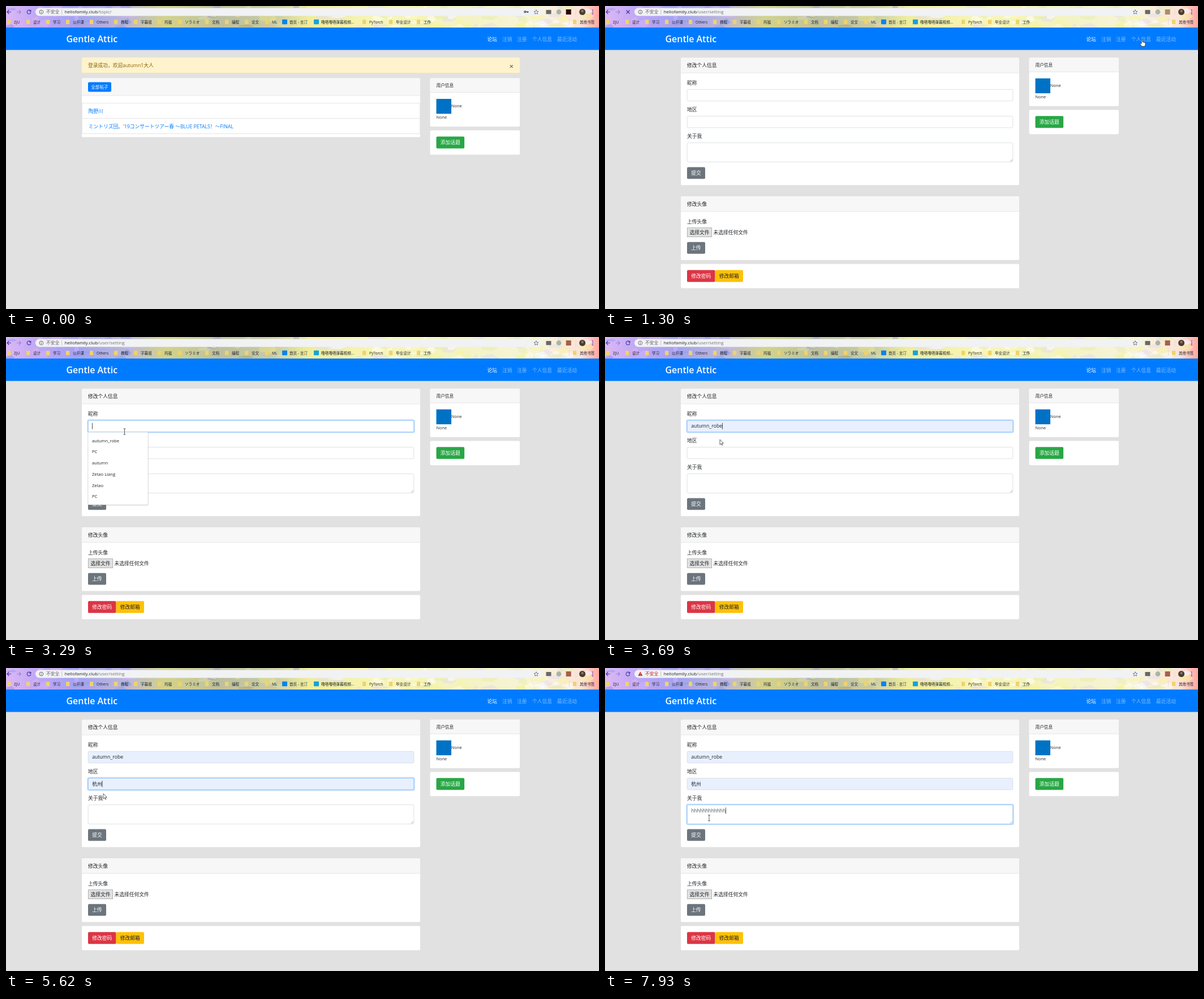
An HTML page for the animation above (8 s loop, 1048 px wide and 535 px high).

```html
<!DOCTYPE html>
<html lang="zh-CN">
<head>
<meta charset="utf-8">
<title>Gentle Attic</title>
<style>
html, body { margin: 0; width: 100%; height: 100%; overflow: hidden; background: #e1e1e1; }
svg { display: block; width: 100%; height: 100%; }
text { font-family: "Open Sans", "Noto Sans CJK SC", "Noto Sans CJK", sans-serif; white-space: pre; }
</style>
</head>
<body>
<svg id="stage" viewBox="0 0 1048 535" preserveAspectRatio="none"></svg>
<script>
const LOOP = 8000, INK = '#212529', BLUE = '#007bff', BASE = 8.74, SMALL = 7.64;
const stage = document.getElementById('stage');
const $ = id => document.getElementById(id);

// markup helpers
const rect = (x, y, w, h, fill, r = 0, more = '') =>
  `<rect x="${x}" y="${y}" width="${w}" height="${h}" rx="${r}" fill="${fill}" ${more}/>`;
const text = (x, y, s, size = BASE, fill = INK, more = '') =>
  `<text x="${x}" y="${y}" font-size="${size}" fill="${fill}" ${more}>${s}</text>`;
const line = (d, color, w = 1, more = '') =>
  `<path d="${d}" fill="none" stroke="${color}" stroke-width="${w}" ${more}/>`;
const circle = (x, y, r, fill, more = '') => `<circle cx="${x}" cy="${y}" r="${r}" fill="${fill}" ${more}/>`;
const group = (id, s, more = '') => `<g id="${id}" ${more}>${s}</g>`;
const button = (x, y, w, h, fill, s, color = '#fff', size = BASE) =>
  rect(x, y, w, h, fill, 2) + text(x + w / 2, y + h / 2 + size * .37, s, size, color, 'text-anchor="middle"');
const card = (x, y, w, h, head = 0) => rect(x, y, w, h, '#fff', 2) +
  (head ? rect(x, y, w, head, '#f7f7f7', 2) + line(`M${x} ${y + head}h${w}`, '#dfdfdf', .7) : '');

// browser theme: gradient with seeded blotches
function theme() {
  const stops = [[0, '#dcb8f4'], [6, '#bba6f6'], [12, '#a3a2f0'], [20, '#bab6d8'], [27, '#d2d38c'], [36, '#bcc0a0'],
    [45, '#c8cba4'], [51, '#efed9c'], [62, '#f7f5b6'], [78, '#f4f3c4'], [90, '#f7f4dc'], [97, '#fbe3d8'], [100, '#ffa6a0']];
  const tones = [['#908ef0', '#cdb6ff', '#e2b8ee', '#86a2f0'], ['#a3a37a', '#e8e48a', '#989dca', '#d9dbb6'],
    ['#f9f3a0', '#ffffff', '#e3dcf0', '#e6eeb0']];
  let seed = 7;
  const rnd = () => (seed = seed * 16807 % 2147483647) / 2147483647;
  let s = '<linearGradient id="sky">' + stops.map(([o, c]) => `<stop offset="${o}%" stop-color="${c}"/>`).join('') +
    '</linearGradient>' + rect(0, 0, 1048, 38, 'url(#sky)');
  for (let i = 0; i < 110; i++) {
    const x = rnd() * 1020, y = rnd() * 38, w = 5 + rnd() * 16, h = 2 + rnd() * 5;
    const zone = tones[x < 210 ? 0 : x < 540 ? 1 : 2];
    s += `<path d="M${x} ${y}l${w} ${-h}l${w * .6} ${h * 1.4}l${-w * .5} ${h}l${-w} ${-h * .3}z" fill="${zone[i % 4]}" opacity=".5"/>`;
  }
  return `<g clip-path="inset(0)"><svg width="1048" height="38">${s}</svg></g>`;
}

function toolbar() {
  const marks = [[14, 'ZJU'], [48, '设计'], [83, '学习'], [118, '公开课'], [160, 'Others'], [203, '教程'], [238, '字幕组'],
    [280, '托福'], [316, 'ソラミオ'], [364, '文档'], [399, '编程'], [434, '论文'], [470, 'ML'], [501, '首页 - 言汀', '#0a84e8'],
    [557, '噜嗒噜嗒弹幕视频...', '#16a3d8'], [642, 'PyTorch'], [689, '毕业设计'], [738, '工作'], [1014, '其他书签']];
  const url = path => text(103.7, 13.4, `hellofamily.club<tspan fill="#72767b">${path}</tspan>`, 8);
  return theme() + rect(52, 3.5, 896, 14, '#f1f2f4', 7) +
    line('M9 10.5H2.2M5.4 7L2 10.5L5.4 14', '#4030b0', 1.1) +
    line('M19 10.5H26M22.8 7L26.2 10.5L22.8 14', '#9a83dc', 1.1) +
    group('reload', line('M43.2 8.4A3.4 3.4 0 1 0 43.9 11.2', '#4030a0', 1.1) + '<path d="M44.4 6.6v3.4h-3.4z" fill="#4030a0"/>') +
    group('stop', line('M37.6 7.5l6 6m0-6l-6 6', '#4030a0', 1.1)) +
    group('info', circle(62.4, 10.5, 3.4, 'none', 'stroke="#5f6368" stroke-width=".9"') + line('M62.4 10v2.4M62.4 8.3v1', '#5f6368', .9)) +
    group('warn', '<path d="M62.4 6.6L66.4 13.8H58.4Z" fill="#c5221f"/>' + line('M62.4 9v2.2M62.4 12v.9', '#fff', .8)) +
    text(71, 13.4, '不安全', 7.8, '#5f6368', 'id="unsafe"') + line('M98.7 6v9', '#b5b8bc', .8) +
    group('urlA', url('/topic/') + circle(917.3, 10.3, 1.5, 'none', 'stroke="#444" stroke-width="1.3"') +
      line('M919 10.3h4.5M922 10.3v1.9', '#444', 1.4)) +
    group('urlB', url('/user/setting')) +
    line('M937 6.6l1.1 2.7 2.9.2-2.2 1.9.7 2.8-2.5-1.5-2.5 1.5.7-2.8-2.2-1.9 2.9-.2z', '#5f6368', .8) +
    rect(954.5, 7, 9, 7.2, '#686868', .6) + circle(977, 10.5, 4.4, '#a9b5a4') +
    rect(989.7, 6, 9, 9, '#2a0508', 0, 'id="addon"') + line('M1007 5v11', '#ddd6c4', .6) +
    circle(1018.6, 10.5, 5.5, '#4a3c30') + circle(1018.6, 9, 2.2, '#8b7660') +
    [7.2, 10.5, 13.8].map(y => circle(1036.8, y, 1, '#6a38a8')).join('') +
    line('M995.5 23v10', '#d8d2b8', .7) +
    marks.map(([x, s, c]) => (c ? rect(x - 13, 23.7, 9, 8.6, c, 1) : rect(x - 12, 24.2, 6.2, 7.8, '#f2d268', .8)) +
      text(x, 30.6, s, 6.6, '#202124')).join('');
}

const links = [[850.5, '论坛', 18], [877, '注销', 18], [903, '注册', 18], [930, '个人信息', 35], [974, '最近活动', 35]];
const navbar = () => rect(0, 38, 1048, 39.6, BLUE) + text(106.4, 64.2, 'Gentle Attic', 16, '#fff', 'font-weight="600"') +
  links.map(([x, s], i) => text(x, 61.8, s, BASE, '#fff', `id="link${i}"`)).join('');

const sidebar = dy => `<g transform="translate(0 ${dy})">` + card(749.6, 127.5, 158.4, 85.4, 25) +
  text(760.6, 143, '用户信息', SMALL) + rect(760.5, 164, 26.5, 26.3, '#0072c6') +
  text(787, 179.4, 'None', 7.3) + text(760.5, 199.2, 'None', 7.3) +
  card(749.6, 219.6, 158.4, 42.8) + button(760.5, 230.4, 49.6, 21, '#28a745', '添加话题') + '</g>';

const forum = () => rect(134, 91, 774, 27, '#fff3cd', 2, 'stroke="#ffeeba" stroke-width=".6"') +
  text(145, 108, '登录成功，欢迎autumn1大人', BASE, '#856404') +
  text(893.3, 111, '×', 13.1, '#7f7a67', 'font-weight="700" text-anchor="middle"') +
  card(134, 127.5, 598, 104, 30.6) + button(145, 134.4, 41, 17, BLUE, '全部帖子', '#fff', SMALL) +
  line('M134.4 171.5H731.6V225.5H134.4ZM134.4 198.5H731.6', '#dfdfdf', .8) +
  text(145.8, 188.5, '陶野川', BASE, BLUE) +
  text(145.8, 215.5, "ミントリズ団。'19コンサートツアー春 ～BLUE PETALS！～FINAL", BASE, BLUE) + sidebar(0);

const fields = [
  { y: 147.3, h: 20.4, base: 160.4, label: '昵称', from: 2280, to: 4840, open: 2370, hover: 3440, done: 3690,
    value: 'autumn_robe', items: ['autumn_robe', 'PC', 'autumn', 'Zetao Liang', 'Zetao', 'PC'] },
  { y: 194.5, h: 20.4, base: 207.8, label: '地区', from: 4840, to: 6390, open: 4990, hover: 5400, done: 5620,
    value: '杭州', items: ['杭州'] },
  { y: 241.6, h: 33.8, base: 255, label: '关于我', from: 6390, to: 1e6, items: [] }
];
const ROW = 19.7;
const control = (f, i) => text(145, f.y - 8.2, f.label) +
  rect(144.2, f.y - .9, 577.6, f.h + 1.8, 'none', 2.6, `id="ring${i}" stroke="#bfdeff" stroke-width="1.8"`) +
  rect(145.2, f.y, 575.6, f.h, '#fff', 2, `id="box${i}" stroke="#ced4da" stroke-width=".7"`) +
  rect(145.2, f.y, 575.6, f.h, 'none', 2, `id="edge${i}" stroke="#80bdff" stroke-width=".7"`) +
  text(152.2, f.base, '', i == 2 ? 8.25 : BASE, i == 2 ? '#495057' : INK, `id="value${i}"`);
const menu = (f, i) => {
  const top = f.y + f.h + .4, h = 10 + ROW * f.items.length;
  return group('menu' + i, rect(144.6, top + .6, 107, h + .6, '#000', 1.5, 'opacity=".14"') +
    rect(145, top, 106, h, '#fff', 1, 'stroke="#cfcfcf" stroke-width=".5"') +
    rect(145, top + 5, 106, ROW, '#ececec', 0, `id="row${i}"`) +
    f.items.map((s, k) => text(152, top + 17.6 + k * ROW, s, SMALL)).join(''));
};
const settings = () => card(134, 91.5, 598, 224.8, 26.6) + text(145, 108, '修改个人信息') +
  fields.map(control).join('') + line('M716 274.4l3.8-3.8M718 274.4l1.8-1.8', '#888', .6) +
  button(145, 284.4, 32, 20.8, '#6c757d', '提交') +
  card(134, 336, 598, 112.6, 26.6) + text(145, 352.6, '修改头像') + text(145, 384, '上传头像') +
  rect(145.3, 391.7, 43.4, 16, '#e1e1e1', 0, 'stroke="#999" stroke-width=".7"') +
  text(149.5, 403, '选择文件') + text(191.5, 403, '未选择任何文件') +
  button(145, 416.8, 32, 20.8, '#6c757d', '上传') +
  card(134, 455.5, 598, 42.8) + button(145, 466.3, 49.6, 21, '#dc3545', '修改密码') +
  button(194.6, 466.3, 49.4, 21, '#ffc107', '修改邮箱', INK) + sidebar(-36.2) +
  rect(0, 0, .7, 11, '#000', 0, 'id="caret"') + menu(fields[0], 0) + menu(fields[1], 1);

const skin = 'fill="#fff" stroke="#222" stroke-width=".7" stroke-linejoin="round"';
const pointer = () => group('pointer',
  `<path id="arrow" d="M0 0V9.2L2.1 7.2L3.5 10.3L4.9 9.7L3.5 6.7H6.4Z" ${skin}/>` +
  `<path id="hand" d="M-.9 .9C-.9-.3 .9-.3 .9 .9V4.2C1.5 3.7 2.6 3.9 2.7 4.8C3.4 4.3 4.3 4.6 4.4 5.4C5.2 5 6 5.4 6 6.2V8.5C6 10 5 10.5 5 11.8H-.8C-1 10-3.2 8.3-3.3 6.8C-3.2 5.9-1.9 6-.9 7.3Z" ${skin}/>` +
  line('M-2-5H2M0-5V5M-2 5H2', '#333', .8, 'id="beam"'));

stage.innerHTML = rect(0, 0, 1048, 535, '#e1e1e1') + group('forum', forum()) + group('settings', settings()) +
  navbar() + toolbar() + pointer();

// pointer stops: time, x, y
const path = [[120, 912, 504], [740, 985, 62], [890, 949, 59.5], [1510, 949, 59.5], [2130, 214, 157], [2830, 214, 157],
  [2990, 212, 158], [3140, 212, 158], [3290, 209.5, 167], [3520, 203, 181], [3920, 203, 181], [4460, 190.5, 188],
  [4690, 183, 202], [5240, 183, 202], [5620, 172, 221.8], [5770, 172, 221.8], [6160, 172, 254.5], [7780, 172, 254.5],
  [7930, 184, 264.8], [LOOP, 184, 264.8]];
const blinks = [2280, 3690, 4840, 5620, 6390, 6940, 7470];
const clamp = v => Math.max(0, Math.min(1, v));
const show = (id, on) => $(id).style.display = on ? '' : 'none';

function pointerAt(t) {
  const i = Math.max(1, path.findIndex(p => p[0] > t)), [a, x, y] = path[i - 1], [b, u, v] = path[i];
  const k = clamp((t - a) / (b - a)), e = k * k * (3 - 2 * k);
  return [x + (u - x) * e, y + (v - y) * e];
}

function movePointer(t, second) {
  const [x, y] = pointerAt(t);
  const over = y > 51 && y < 68 ? links.findIndex(l => x >= l[0] && x <= l[0] + l[2]) : -1;
  const typing = second && x > 145 && x < 721 && fields.some(f => y > f.y && y < f.y + f.h);
  $('pointer').setAttribute('transform', `translate(${x} ${y})`);
  show('pointer', t >= 120 && (t < 6940 || t >= 7780));
  show('hand', over >= 0);
  show('beam', typing);
  show('arrow', over < 0 && !typing);
  links.forEach((l, i) => $('link' + i).setAttribute('fill-opacity', i == 0 ? 1 : i == over && !second ? .75 : .5));
}

function draw(t) {
  const second = t >= 1300, loading = t >= 1210 && t < 1510, danger = t >= 6940;
  for (const id of ['forum', 'urlA']) show(id, !second);
  for (const id of ['settings', 'urlB']) show(id, second);
  show('stop', loading);
  show('reload', !loading);
  show('warn', danger);
  show('info', !danger);
  $('unsafe').setAttribute('fill', danger ? '#c5221f' : '#5f6368');
  $('addon').setAttribute('fill', !second ? '#2a0508' : loading ? '#b08a70' : '#a5604c');

  const count = t < 6940 ? 0 : t < 7470 ? 1 : Math.round(1 + 11 * Math.min(7, 1 + Math.floor((t - 7470) / 76)) / 7);
  show('caret', false);
  fields.forEach((f, i) => {
    const glow = clamp((t - f.from) / 120) - clamp((t - f.to) / 120), filled = t >= f.hover;
    $('ring' + i).setAttribute('opacity', glow);
    $('edge' + i).setAttribute('opacity', glow);
    $('box' + i).setAttribute('fill', filled ? '#e8f0fe' : '#fff');
    const value = $('value' + i);
    value.textContent = i == 2 ? 'h'.repeat(count) : filled ? f.value : '';
    if (f.items.length) {
      show('menu' + i, t >= f.open && t < f.done);
      show('row' + i, filled);
    }
    if (t >= f.from && t < f.to) {
      const since = t - blinks.filter(b => b <= t).pop(), ahead = i == 2 || t >= f.done;
      show('caret', since % 1000 < 500);
      $('caret').setAttribute('x', 152.2 + (ahead ? value.getComputedTextLength() : 0));
      $('caret').setAttribute('y', f.base - 8.6);
    }
  });
  movePointer(t, second);
}

const start = performance.now();
function tick() {
  draw((performance.now() - start) % LOOP);
  requestAnimationFrame(tick);
}
tick();
</script>
</body>
</html>
```
